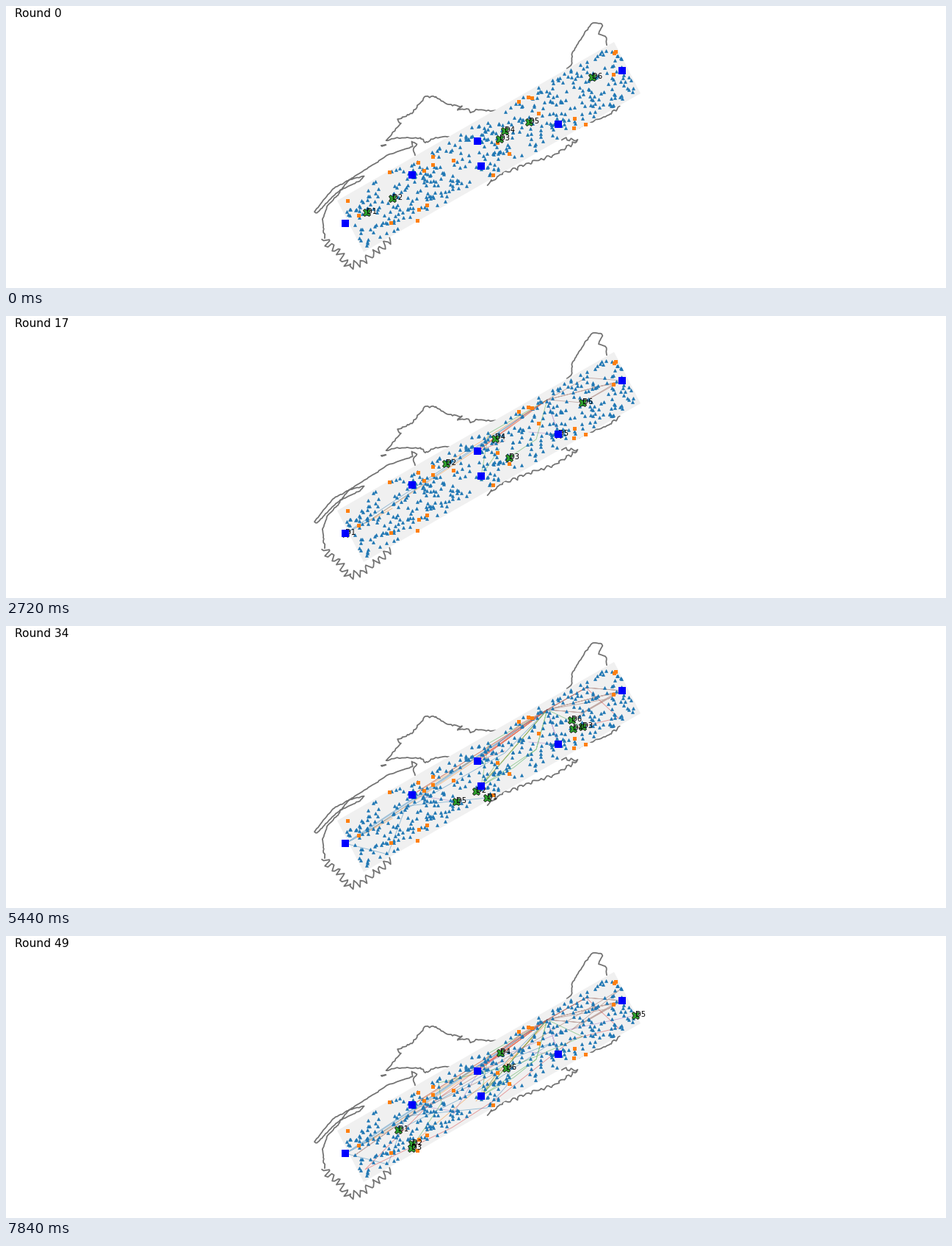
Animation of 1280x384 px, one loop 8 s. Source, as a matplotlib script:

```python
import numpy as np
import matplotlib.pyplot as plt
from matplotlib.animation import FuncAnimation

W, H, DPI = 1280, 384, 80
ROUNDS, STEP_MS = 50, 160
rng = np.random.default_rng(7)

plt.rcParams["font.family"] = "DejaVu Sans"
fig = plt.figure(figsize=(W / DPI, H / DPI), dpi=DPI, facecolor="white")
ax = fig.add_axes([0, 0, 1, 1])
ax.set_xlim(0, W)
ax.set_ylim(H, 0)
ax.axis("off")


def shore(points, amp, fjord=0):
    """Draw a coast through the points, with noise and regular inlets."""
    p = np.array(points, float)
    dist = np.r_[0, np.cumsum(np.hypot(*np.diff(p, axis=0).T))]
    s = np.linspace(0, dist[-1], int(dist[-1] / 2.5) + 3)
    xy = np.column_stack([np.interp(s, dist, p[:, i]) for i in (0, 1)])
    tangent = np.gradient(xy, axis=0)
    normal = tangent[:, ::-1] * [-1, 1] / np.hypot(*tangent.T)[:, None]
    phase = np.cumsum(rng.uniform(.8, 2.2, len(s)))
    xy += normal * (fjord * np.sin(phase))[:, None]
    xy[1:-1] += rng.normal(0, amp, (len(s) - 2, 2))
    ax.plot(*xy.T, color="#737373", lw=1.6, zorder=1)


# Cape, northern shore, islet, bay
shore([(764, 85), (770, 80), (771, 64), (782, 46), (798, 23), (810, 24),
       (813, 27), (806, 38), (817, 42), (818, 53)], .4)
shore([(672, 143), (640, 141), (633, 146), (630, 140), (614, 141),
       (622, 137), (601, 134), (586, 124), (571, 123), (553, 146),
       (533, 155), (538, 160), (517, 184), (532, 180), (565, 180),
       (570, 187), (586, 179), (603, 178)], .6)
shore([(511, 190), (518, 189), (512, 191)], .1)
shore([(557, 203), (554, 195), (560, 188), (552, 184), (554, 191),
       (520, 203), (464, 239), (445, 249), (420, 280), (423, 283),
       (443, 261), (456, 250), (467, 237), (488, 231), (482, 238),
       (455, 251)], .3)
# West coast, its ragged south end, and the Atlantic side
shore([(455, 251), (454, 256), (438, 271), (431, 290), (434, 316)], .5)
shore([(434, 316), (439, 326), (453, 335), (467, 356), (484, 349),
       (507, 333), (525, 318)], .6, 5)
shore([(836, 137), (822, 148), (793, 159), (774, 168)], .5, .8)
shore([(757, 181), (779, 183), (746, 203), (715, 213), (676, 228),
       (655, 243)], .6, 1.6)

# Service area with its scattered sites
corner = np.array([451, 265])
along, across = np.array([377, -216]), np.array([36, 70])
area = [corner, corner + along, corner + along + across, corner + across]
ax.add_patch(plt.Polygon(area, fc="#f0f0f0", ec="none", zorder=2))

uv = rng.uniform([.005, .03], [.998, .95], (450, 2))
sites = corner + uv[:, :1] * along + uv[:, 1:] * across
events = [(830, 62), (828, 64), (827, 93), (711, 124), (716, 125),
          (698, 130), (725, 146), (774, 153), (789, 161), (773, 166),
          (669, 186), (685, 201), (663, 230), (609, 210), (581, 205),
          (581, 216), (561, 213), (569, 224), (522, 226), (465, 265),
          (480, 285), (524, 295), (560, 292), (562, 277), (573, 271)]
bases = [(462, 296), (553, 230), (647, 218), (642, 184), (752, 161), (839, 88)]
HUB = (737, 114)


def markers(points, marker, color, size, z, edge=0.0):
    ax.plot(*np.array(points).T, ls="", marker=marker, color=color,
            ms=size, mew=edge, zorder=z)


markers(sites, "^", "#1f77b4", 3.6, 4, .6)
markers(events, "s", "#ff7f0e", 4.5, 5)
markers(bases, "s", "#0000ff", 9, 20)


class Drone:
    """Flies straight between stops keyed by round."""

    def __init__(self, index, home, hub, stops):
        keys = dict(stops)
        keys.update({t: bases[index] for t in home})
        keys.update({t: HUB for t in hub})
        # Late in the run, detour between the main stops
        for t, a, b in ((37, 34, 43), (40, 34, 43), (46, 43, 49)):
            f = (t - a) / (b - a)
            mid = np.array(keys[a]) * (1 - f) + np.array(keys[b]) * f
            shift = rng.uniform(-.08, .08) * along
            shift = shift + rng.uniform(-.25, .25) * across
            keys.setdefault(t, mid + shift)
        self.t = np.array(sorted(keys))
        self.x, self.y = np.array([keys[t] for t in self.t], float).T

        z = 8 + index
        self.trail, = ax.plot([], [], color=f"C{index}", lw=.8,
                              alpha=.45, zorder=3)
        self.body, = ax.plot([], [], "X", ms=9.5, mfc="#2ca02c", mec="#111111",
                             mew=.7, zorder=z)
        self.label = ax.text(0, 0, f"D{index + 1}", fontsize=9, zorder=z + .5)

    def move(self, t):
        x, y = np.interp(t, self.t, self.x), np.interp(t, self.t, self.y)
        past = self.t < t
        self.trail.set_data(np.r_[self.x[past], x], np.r_[self.y[past], y])
        self.body.set_data([x], [y])
        self.label.set_position((x, y + 2))


d1 = Drone(0, (1, 5, 17, 28), (12, 22),
           {0: (491, 281), 7: (500, 275), 21: (679, 173), 27: (472, 291),
            29: (520, 311), 31: (545, 245), 34: (655, 234), 43: (742, 146),
            49: (534, 264)})
d2 = Drone(1, (18, 25), (14, 22, 29),
           {0: (526, 262), 2: (490, 282), 6: (490, 282), 12: (671, 162),
            21: (722, 124), 27: (672, 162), 34: (640, 225), 43: (735, 120),
            49: (553, 283)})
d3 = Drone(2, (3, 6, 18, 28), (11, 14, 21, 23, 31),
           {0: (672, 181), 8: (657, 160), 16: (722, 168), 25: (722, 168),
            27: (691, 193), 34: (785, 137), 43: (589, 200), 49: (552, 289)})
d4 = Drone(3, (2, 6, 16, 25), (10, 13, 20, 23, 28),
           {0: (679, 170), 8: (705, 135), 27: (703, 132), 30: (790, 84),
            32: (834, 125), 34: (772, 140), 42: (489, 318), 43: (489, 318),
            49: (673, 159)})
d5 = Drone(4, (2, 6, 15, 17, 24), (9, 13, 19, 22, 26, 28),
           {0: (712, 158), 33: bases[1], 34: (613, 239), 43: (627, 183),
            49: (857, 108)})
d6 = Drone(5, (10, 16, 23, 31), (8, 12, 14, 19, 26, 28),
           {0: (798, 97), 2: (827, 93), 4: (827, 93), 6: (785, 118),
            9: (790, 84), 17: (785, 118), 21: (821, 99), 30: (790, 84),
            34: (770, 128), 37: (836, 73), 43: (473, 300), 49: (681, 180)})
drones = [d1, d2, d3, d4, d5, d6]
title = ax.text(12, 15.3, "", fontsize=14)


def draw(n):
    title.set_text(f"Round {n}")
    for drone in drones:
        drone.move(n)
    return []


anim = FuncAnimation(fig, draw, frames=ROUNDS, interval=STEP_MS,
                     repeat=True, repeat_delay=0)
plt.show()
```
